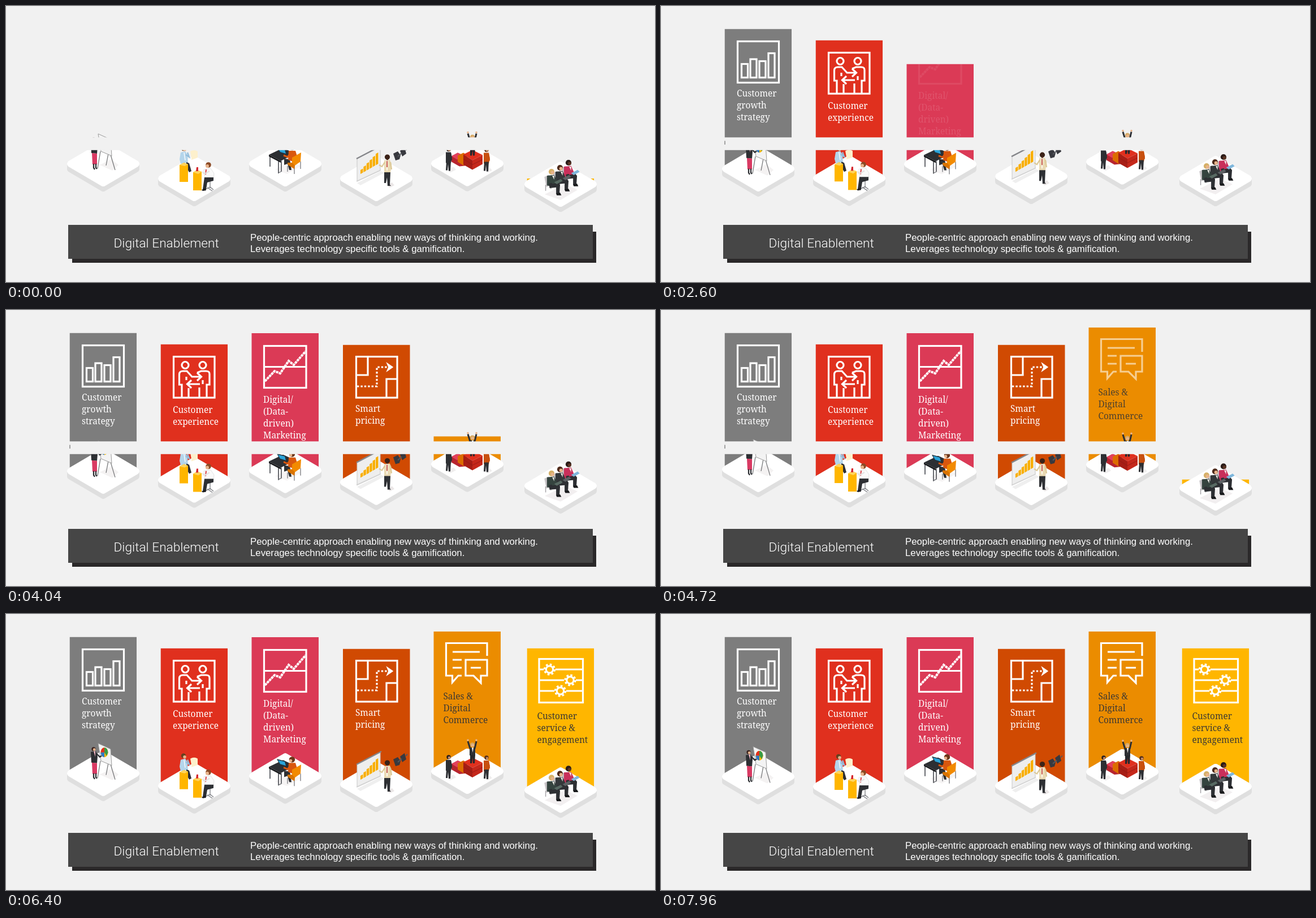
These frames come from a looping animation (1148 by 488 pixels, 8 s). An HTML page:

```html
<!DOCTYPE html>
<html lang="en">
<head>
<meta charset="utf-8">
<title>Digital Enablement</title>
<style>
  html, body { margin: 0; width: 100%; height: 100%; overflow: hidden; background: #f1f1f1; }
  svg { display: block; }
  .label { font: 15.4px "Noto Serif", serif; }
  .title { font: 300 22.7px Roboto, "Open Sans", sans-serif; }
  .copy { font: 16.77px "Liberation Sans", Arial, sans-serif; }
  .icon { fill: none; stroke: #fff; stroke-width: 3.2; }
</style>
</head>
<body>
<svg id="stage" width="1148" height="488" viewBox="0 0 1148 488"></svg>
<script>
const LOOP = 8000, FRAME = 40, RISE = 940, BAND_END = 5640, FLOOR = 305;
const DARK = '#2d2f33', SKIN = '#e8b48c', YELLOW = '#ffb600';

const fill = (d, color) => `<path d="${d}" fill="${color}"/>`;
const line = (d, color, w = 1.3) => `<path d="${d}" fill="none" stroke="${color}" stroke-width="${w}"/>`;
const dot = (x, y, r, color) => `<circle cx="${x}" cy="${y}" r="${r}" fill="${color}"/>`;
const path = (d, attrs = '') => `<path d="${d}" ${attrs}/>`;
const box = (x, y, w, h) => `<rect x="${x}" y="${y}" width="${w}" height="${h}"/>`;
const gear = (x, y) =>
  `<circle cx="${x}" cy="${y}" r="6.2"/>` +
  `<circle cx="${x}" cy="${y}" r="9" stroke-dasharray="3.6 3.47"/>`;

// Icons, in stage coordinates
const icons = [
  box(135.5, 62.5, 73, 73) + box(142.5, 102.5, 11, 24) + box(158, 94, 11, 32.5) +
    box(174, 97.5, 11, 29) + box(190, 83.5, 11, 43),
  box(296.5, 82.5, 72.5, 72.5) +
    '<circle cx="317" cy="97.5" r="6"/><circle cx="348" cy="97.5" r="6"/>' +
    path('M311 154V132H306.5V114Q306.5 108 313 108H320L329 118H345M338 111L345.5 118L338 125') +
    path('M355 154V132H360V113Q360 108 354 108H345L338 111M343 131H321M328 124L320.5 131L328 138') +
    path('M323 154V138M342 154V137M319 118V124M348 124V131'),
  box(456.5, 63.5, 74.5, 74) + path('M457 100.5H531') +
    path('M458 126L475 108L485 112L500 90L509 97L530 73', 'stroke-width="4" stroke-dasharray="4.5 1"'),
  box(619.5, 82.5, 72.5, 72.5) + path('M620 115H640V83M673 155V122H692') +
    path('M621 135H656V101H674', 'stroke-dasharray="3.4 3"') +
    path('M674 94L684 101L674 108L677 101Z', 'fill="#fff" stroke-width="1.5"'),
  path('M851 74V51.5H778.5V109H789.5V121L800 109H806') +
    path('M813 81H851V109H840V122L827 109H813Z') +
    path('M790 67H838M790 81H806M790 95H806M822 95H840'),
  box(943, 79.5, 77.5, 77) + gear(961.5, 98) + gear(998, 117) + gear(980.5, 136) +
    path('M943 98H951M972 98H1020M943 117H987M1008 117H1020M943 136H970M991 136H1020')
];

// Small scenes, relative to the middle of each tile
const presenter =
  fill('M-6 2L14 -8L27 2L16 12Z', '#f4f2f2') +
  line('M-5 -22L-10 8M9 -18L5 3M13 -16L21 11', '#77787a') +
  `<path d="M-9 -53L13 -43L15 -14L-4 -22Z" fill="#f3f3f3" stroke="#9a9a9a" stroke-width="1"/>` +
  `<ellipse cx="2" cy="-37" rx="6.5" ry="8.5" fill="${YELLOW}"/>` +
  fill('M2 -37V-45.5A6.5 8.5 0 0 0 -4.5 -37Z', '#e0301e') +
  fill('M2 -37V-45.5A6.5 8.5 0 0 1 8.5 -37L6 -31Z', '#3a9a46') +
  fill('M2 -37L-4.5 -37A6.5 8.5 0 0 0 2 -28.5Z', '#2f78c4') +
  dot(-17, -43, 3.6, '#3a2320') + dot(-15.8, -42, 2.4, SKIN) +
  fill('M-22 -38L-13 -39L-10 -30L-11 -18L-21 -19Z', DARK) +
  fill('M-17 -39H-14L-14 -29Z', '#f0b6c4') + line('M-12 -35L-6 -29L-3 -31', DARK, 2.4) +
  fill('M-20 -19L-11 -18L-11 1H-19Z', '#d93a63') +
  line('M-17 0V7L-15 10M-13 0V7L-11 9', DARK, 2.3);

const counters =
  fill('M-7 -48Q0 -52 6 -48V-37L1 -35L-5 -33V-37Z', '#fdf0cc') +
  dot(-19, -53, 4.2, '#64401f') + dot(-17, -51, 2.8, SKIN) +
  fill('M-24 -46L-16 -48L-12 -42L-11 -28L-24 -26L-26 -34Z', '#b4d5eb') +
  line('M-15 -42L-9 -38L-12 -46', '#94bedc', 2.4) + line('M-18 -46L-16 -32', '#f7fafc', 1.5) +
  fill('M-14 -29L-9 -27L-5 -13L-9 -11L-14 -20Z', DARK) +
  fill('M-26 -24L-18 -28L-11 -25V6H-26Z', YELLOW) + fill('M-26 -24L-18 -28L-11 -25L-17 -22Z', '#ffd45e') +
  fill('M-2 -11L5 -15L13 -12V21H-2Z', YELLOW) + fill('M-2 -11L5 -15L13 -12L7 -8Z', '#ffd45e') +
  fill('M4 -20H7V-13H3Z', '#d5292f') +
  line('M28 4V17M18 20L28 15L34 20M23 16L32 22', '#7b7d82') +
  dot(25, -24, 4.8, '#8b4a25') + dot(23, -22, 3, SKIN) +
  `<path d="M17 -16L29 -18L35 -9L34 1H19Z" fill="#fafafa" stroke="#d9d9d9" stroke-width=".7"/>` +
  line('M21 -16L20 -7', '#d5292f', 1.8) + line('M27 -13L18 -8L14 -12', '#e4e4e4', 2.2) +
  fill('M18 -2H34V4L23 7L21 19H15L17 5Z', DARK) + fill('M13 20L20 17L21 21L15 22Z', '#1d1d20');

const desk =
  fill('M-18 10L10 -5L28 4L3 18Z', '#f6f4f4') +
  line('M-27 -14V5M-12 -6V17M-7 -5V13', '#696b70', 2) + line('M-12 16L-6 13', '#696b70') +
  line('M4 4V14M16 6V18M27 -4V9', '#8a8a8e', 1.5) +
  fill('M-29 -16L-4 -28L18 -18L-8 -5Z', DARK) + fill('M-29 -16L-8 -5V-2L-29 -13Z', '#191a1d') +
  fill('M-15 -30L0 -26L3 -16L-10 -20Z', '#22313c') + fill('M-13 -28L-1 -25L1 -18L-9 -21Z', '#2ba3d8') +
  fill('M-2 -9L8 -8L11 11H7L4 0L-2 2Z', DARK) +
  dot(12, -29, 5.2, '#6b351a') + dot(9.5, -27, 2.7, SKIN) +
  fill('M6 -23L18 -23L22 -10L16 -3L5 -7Z', '#d9570e') + line('M9 -18L4 -12L-3 -15', '#d9570e', 3) +
  fill('M12 -11L28 -20L27 -4L17 3L16 9L5 2L4 -2L12 -2Z', '#f28a00') + fill('M5 2L4 -2L12 -2L17 3L16 9Z', '#d97300');

const bars = Array.from({ length: 6 }, (_, i) =>
  fill(`M${-28 + i * 5.4} ${-8 - i * 3.1}v${-7 - i * 2.6}l4.4 -2.5v${7 + i * 2.6}Z`, '#f9ae00')
).join('');

const speaker =
  fill('M-34 8L8 -13L14 -10L-28 12Z', '#efefef') +
  `<path d="M-34 -35L7 -57V-14L-34 5Z" fill="#eeeeee" stroke="#c6c6c6" stroke-width="1"/>` +
  line('M-35 -35L9 -58', '#85868a', 2.4) + line('M-35 5L8 -15', '#d3d3d3', 1.6) + bars +
  fill('M30 -44L38 -48L43 -41L41 -34L34 -32Z', '#38393f') + fill('M42 -49L50 -55L53 -44L46 -39Z', '#38393f') +
  line('M38 -39L45 -45M52 -50L55 -53', '#55575d', 2) +
  fill('M18 12L28 7L32 12L24 16Z', '#ebe7e7') +
  dot(19.5, -38, 4.6, '#3b2217') + line('M19.5 -34V-30', '#5f3621', 3) +
  fill('M14 -32L24 -33L27 -25L25 -10H14Z', '#e9d9b2') + fill('M17 -32H21L20 -14H18Z', '#faf6ea') +
  line('M19 -31V-20', '#b92a22', 1.5) +
  line('M15 -29L10 -21L5 -24M25 -29L27 -16', '#dcc997', 2.2) +
  fill('M14 -11H25L24 11L26 13H20L19 -2L17 8H14Z', DARK);

const standing = (x, y, coat, hair) =>
  dot(x, y, 3.7, hair) + dot(x + 1, y + 1, 2.2, '#c58a64') +
  fill(`M${x - 5} ${y + 5}h9l2 10l-2 9h-9Z`, coat) + line(`M${x + 3} ${y + 7}l2 12`, coat, 2.4) +
  fill(`M${x - 4} ${y + 21}h8l-1 17h-3l-1 -12l-1 11h-3Z`, DARK);

const podium =
  fill('M-36 11L-24 6L-20 11L-30 16ZM30 12L40 8L44 12L36 16Z', '#f0eeee') +
  fill('M-28 -13L-17 -19L-4 -13V4L-14 5L-28 -3Z', '#b8252f') + fill('M-28 -13L-17 -19L-6 -14L-18 -7Z', '#e2405c') +
  fill('M-17 -14L-7 -19L2 -14L-6 -8V4L-17 -3Z', '#dc6c00') +
  fill('M-7 -16L9 -24L27 -15L9 -6Z', '#e0301e') + fill('M-7 -16L9 -6V11L-7 2Z', '#a71e15') +
  fill('M9 -6L27 -15V1L9 11Z', '#c5281b') + line('M-7 -8L9 2L27 -7', '#8e1a14', .8) +
  standing(-33, -25, DARK, '#2b211f') + standing(34, -24, '#c8500f', '#57301b') +
  line('M5 -40L1 -53M13 -40L16 -53', DARK, 3) + dot(1, -55, 1.8, SKIN) + dot(16, -55, 1.8, SKIN) +
  dot(9, -47, 3.9, '#d6aa65') + dot(9.3, -45.8, 2.5, SKIN) +
  fill('M4 -42H14L14 -28H4Z', DARK) + fill('M8 -42H11L9.5 -33Z', '#fff') +
  fill('M5 -29H14L13 -14H10L9.5 -24L8 -14H5Z', '#26282c');

const sitter = (x, y, hair, skin, coat, lap) =>
  `<g transform="translate(${x} ${y}) scale(1.16)">` +
  fill('M-11 8L-4 5L-1 21L-8 23Z', '#c9c5c8') + line('M-9 20V29M-1 21V26', '#a7a5a8') +
  dot(0, 0, 4.4, hair) + dot(1.5, 1.4, 2.6, skin) +
  fill('M-7 6L4 5L8 14L4 23L-7 21Z', coat) + fill('M1 6H4L4 12Z', '#f3f1ec') +
  fill('M-4 18L9 15L13 20L12 34H7L7 24L-3 25Z', DARK) + fill('M7 33L13 32L15 36H8Z', '#191a1c') +
  line('M-2 10L2 17L9 16', coat, 3) + fill('M4 16L14 11L17 14L8 19Z', lap) + '</g>';

const audience =
  fill('M-28 18L8 0L30 10L0 28Z', '#f2eff0') +
  sitter(14, -38, '#2a1b17', '#5b3423', '#c9305b', '#7fb7dc') +
  sitter(-1, -29, '#4e2a1b', SKIN, '#34383a', '#5d6265') +
  sitter(-16, -22, '#d5b068', SKIN, '#35443f', '#586a63');

// keys: [ms, y of the lower tip of the tile] for the slow bobbing
const cards = [
  { x: 112.5, top: 40.5, cx: 172, color: '#7d7d7d', text: ['Customer', 'growth', 'strategy'], tx: 134, ty: 160,
    scene: presenter, keys: [[100, 328], [2850, 337], [5600, 329], [8100, 336.5]] },
  { x: 273.5, top: 60.5, cx: 333, color: '#e0301e', text: ['Customer', 'experience'], tx: 295, ty: 182,
    scene: counters, keys: [[2000, 354], [4600, 349], [7300, 354]] },
  { x: 434.3, top: 41, cx: 494, color: '#db3a56', text: ['Digital/', '(Data-', 'driven)', 'Marketing'], tx: 455, ty: 164,
    scene: desk, keys: [[2000, 328], [5700, 336], [9500, 328]] },
  { x: 596, top: 61.5, cx: 655, color: '#d04a02', text: ['Smart', 'pricing'], tx: 618, ty: 179.5,
    scene: speaker, keys: [[0, 354], [2300, 350], [4500, 354], [6400, 350], [9000, 354]] },
  { x: 756.3, top: 31, cx: 816, color: '#eb8c00', ink: '#3d3933', text: ['Sales &amp;', 'Digital', 'Commerce'], tx: 773.5, ty: 151,
    scene: podium, keys: [[1200, 327.5], [4000, 321.5], [7200, 328]] },
  { x: 921.5, top: 60.5, cx: 981, color: '#ffb600', ink: '#3d3933', text: ['Customer', 'service &amp;', 'engagement'], tx: 939.5, ty: 185.5,
    scene: audience, keys: [[0, 364], [2650, 354], [5250, 364.5], [7900, 354]] }
];

const tile =
  '<g stroke-width="12" stroke-linejoin="round">' +
  '<path d="M-58 0L0 -34L58 0V9L0 43L-58 9Z" fill="#dfdfdf" stroke="#dfdfdf"/>' +
  '<path d="M-58 0L0 -34L58 0L0 34Z" fill="#fff" stroke="#fff"/></g>';

const drawCard = (c, i) => `
  <clipPath id="clip${i}"><rect x="${c.x}" width="118.7"/></clipPath>
  <g clip-path="url(#clip${i})">
    <rect x="${c.x}" y="${c.top}" width="118.7" height="300" fill="${c.color}"/>
    <g class="icon" id="icon${i}">${icons[i]}</g>
    <g class="label" id="label${i}" fill="${c.ink || '#fff'}">${
      c.text.map((s, n) => `<text x="${c.tx}" y="${c.ty + n * 21}">${s}</text>`).join('')}</g>
  </g>
  <g id="tile${i}">${tile}${c.scene}</g>`;

const $ = id => document.getElementById(id);
$('stage').innerHTML = cards.map(drawCard).join('') + `
  <g id="band"><rect x="100" y="232.3" width="950" height="22.5" fill="#f1f1f1"/>
    <rect id="tick" x="112.5" y="238.5" width="1" height="6.5" fill="#555"/></g>
  <rect x="117" y="399" width="927" height="55" fill="#2a2829"/>
  <rect x="110" y="387" width="928" height="60" fill="#464646"/>
  <g fill="#fff">
    <text class="title" x="190.5" y="427">Digital Enablement</text>
    <text class="copy" x="432" y="414.5">People-centric approach enabling new ways of thinking and working.</text>
    <text class="copy" x="432" y="434.8">Leverages technology specific tools &amp; gamification.</text>
  </g>`;

cards.forEach((c, i) => Object.assign(c, {
  clip: $('clip' + i).firstElementChild, icon: $('icon' + i), label: $('label' + i), tile: $('tile' + i)
}));

const clamp = v => Math.min(1, Math.max(0, v));

function tipAt(keys, t) {
  let y = keys[0][1];
  for (let i = 1; i < keys.length; i++) {
    const [t0, y0] = keys[i - 1], [t1, y1] = keys[i];
    if (t >= t0) y = y0 + (y1 - y0) * (1 - Math.cos(Math.PI * clamp((t - t0) / (t1 - t0)))) / 2;
  }
  return y;
}

function render(t) {
  cards.forEach((c, i) => {
    const cy = tipAt(c.keys, t) - 49;
    const rise = clamp(t / RISE - i);
    const top = FLOOR + (c.top - FLOOR) * rise;
    const sinceUp = t - (i + 1) * RISE;
    c.tile.setAttribute('transform', `translate(${c.cx} ${cy.toFixed(2)})`);
    c.clip.setAttribute('y', top);
    c.clip.setAttribute('height', Math.max(0, cy - top));
    c.icon.setAttribute('opacity', clamp((sinceUp + 260) / 490));
    c.label.setAttribute('opacity', clamp((sinceUp + 260) / 310));
  });
  $('band').style.display = t < BAND_END ? '' : 'none';
  $('tick').style.display = t > 240 ? '' : 'none';
}

const start = performance.now();
function tick() {
  const t = (performance.now() - start) % LOOP;
  render(Math.floor(t / FRAME) * FRAME);
  requestAnimationFrame(tick);
}
tick();
</script>
</body>
</html>
```
